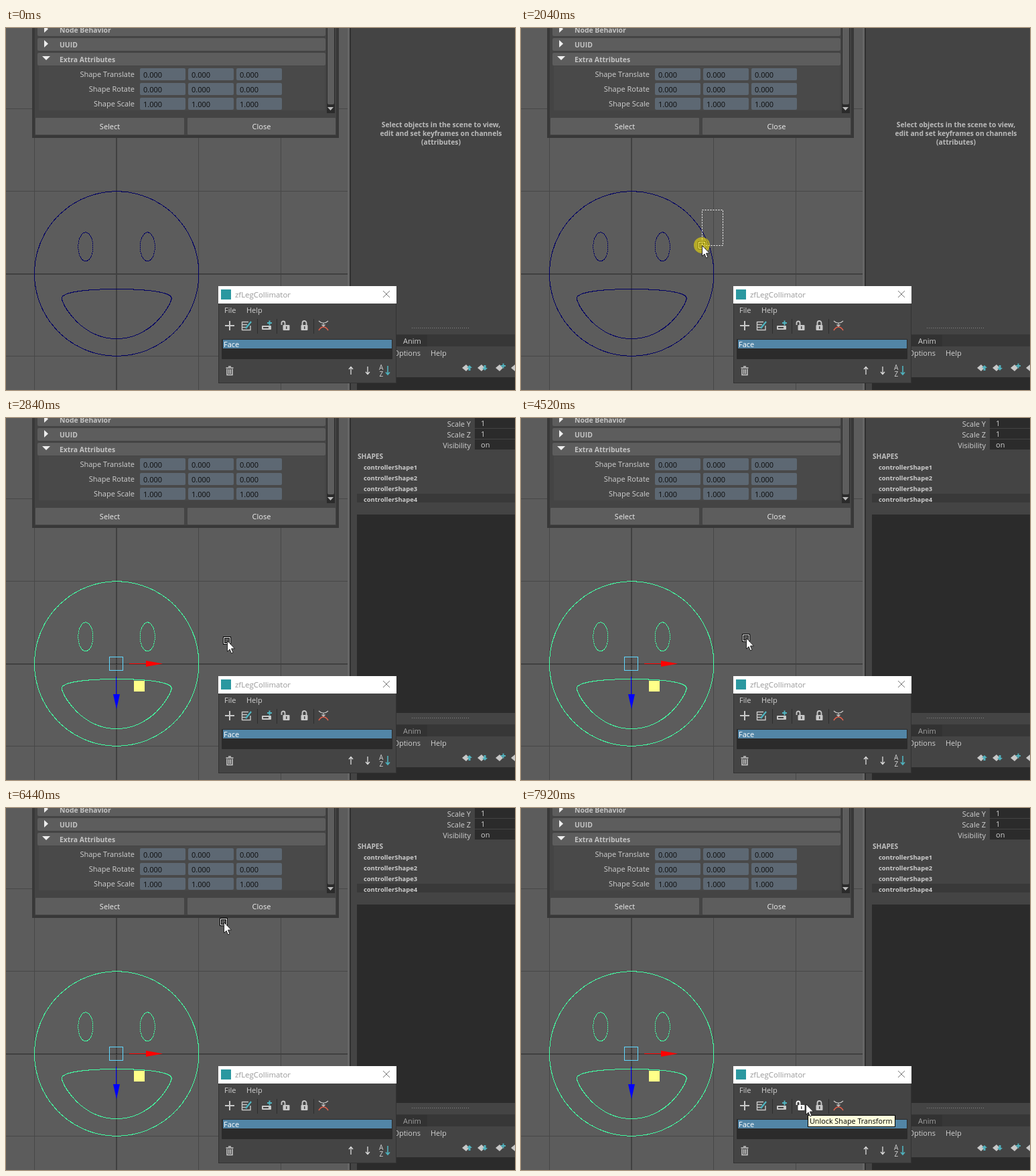
Write an HTML page with a canvas that moves like this. It is 760x540 px and loops after 8 s.

```html
<!DOCTYPE html>
<html lang="en">
<head>
<meta charset="utf-8">
<title>Rig controller</title>
<style>
html, body { margin: 0; width: 100%; height: 100%; overflow: hidden; background: #444; }
canvas { display: block; }
</style>
</head>
<body>
<canvas id="stage" width="760" height="540"></canvas>
<script>
const c = document.getElementById('stage').getContext('2d');
const LOOP = 8000, SELECTED_AT = 2360;
const TEAL = '#4fb3bf', ICON = '#c8c8c8';

// Pointer path: time, x, y
const path = [
  [120, 520, 531], [200, 455, 440], [280, 370, 330], [360, 325, 304], [480, 313, 338],
  [640, 313, 338], [680, 309, 334], [720, 317, 328], [1280, 317, 328], [1520, 301, 271],
  [1800, 301, 271], [2040, 270, 324], [2480, 270, 324], [2840, 330, 332],
  [4480, 330, 332], [4520, 336, 328], [4880, 700, 110], [5080, 650, 7], [5320, 543, 16],
  [5400, 480, 42], [5560, 306, 131], [5720, 190, 115], [5840, 158, 95], [6160, 468, 61],
  [6240, 435, 78], [6440, 325, 170], [6640, 50, 300], [6840, 200, 400], [7040, 429, 441],
  [7080, 429, 441], [7200, 425, 441]
];

function pointerAt(t) {
  const i = path.findIndex(p => p[0] > t);
  if (i < 0) return path[path.length - 1].slice(1);
  const [t0, x0, y0] = path[i - 1], [t1, x1, y1] = path[i];
  const k = (t - t0) / (t1 - t0);
  return [Math.round(x0 + (x1 - x0) * k), Math.round(y0 + (y1 - y0) * k)];
}

function box(color, x, y, w, h, radius = 0) {
  c.fillStyle = color;
  c.beginPath();
  c.roundRect(x, y, w, h, radius);
  c.fill();
}
function frame(color, x, y, w, h) {
  c.strokeStyle = color;
  c.lineWidth = 1;
  c.strokeRect(x + .5, y + .5, w - 1, h - 1);
}
function text(s, x, y, { color = '#d0d0d0', size = 11, weight = 400, align = 'left' } = {}) {
  c.font = `${weight} ${size}px "Open Sans", sans-serif`;
  c.fillStyle = color;
  c.textAlign = align;
  c.fillText(s, x, y);
}
function line(color, d, width = 1) {
  c.strokeStyle = color;
  c.lineWidth = width;
  c.stroke(new Path2D(d));
}
function shape(color, d) {
  c.fillStyle = color;
  c.fill(new Path2D(d));
}
function at(x, y, draw) {
  c.save();
  c.translate(x, y);
  draw();
  c.restore();
}

// The face is drawn in whole pixels, without smoothing
const face = new Path2D();
function pixelCurve(point, steps) {
  for (let i = 0; i <= steps; i++) {
    const [x, y] = point(i / steps);
    face.rect(Math.floor(x), Math.floor(y), 1, 1);
  }
}
function pixelEllipse(cx, cy, rx, ry) {
  pixelCurve(k => [cx + rx * Math.cos(k * 2 * Math.PI), cy + ry * Math.sin(k * 2 * Math.PI)], rx * 8);
}
function pixelBezier(...points) {
  pixelCurve(k => [0, 1].map(axis => {
    const [a, b, d, e] = points.map(p => p[axis]), m = 1 - k;
    return m * m * m * a + 3 * m * m * k * b + 3 * m * k * k * d + k * k * k * e;
  }), 180);
}
pixelEllipse(165.2, 366.5, 122.7, 122.7);
pixelEllipse(118.8, 326.3, 11, 21.5);
pixelEllipse(211.3, 326.3, 11, 21.5);
for (const side of [-1, 1]) {
  const x = dx => 165.2 + side * dx;
  pixelBezier([x(82), 403], [x(81), 393], [x(40), 389.5], [x(0), 389.5]);
  pixelBezier([x(82), 403], [x(82), 411], [x(54), 463.5], [x(0), 463.5]);
}

function viewport(selected) {
  box('#5c5c5c', 0, 0, 510, 540);
  for (const x of [42, 287, 410]) box('#474747', x, 0, 1, 540);
  for (const y of [120, 243, 489]) box('#474747', 0, y, 510, 1);
  box('#404040', 164, 0, 2, 540);
  box('#404040', 0, 366, 510, 2);

  c.fillStyle = selected ? '#43ffa3' : '#000064';
  c.fill(face);
  if (!selected) return;
  frame('#5fd7ff', 154, 356, 21, 21);
  box('#202020', 164, 366, 2, 1);
  line('#f00', 'M184 366.5H210');
  shape('#f00', 'M209 362L234 366.5L209 371Z');
  line('#00f', 'M164.5 386V413');
  shape('#00f', 'M160 412H170L165 434Z');
  box('#ffff88', 191, 392, 16, 16);
}

function channelBox(selected) {
  box('#444', 510, 0, 250, 540);
  box('#666', 510, 0, 3, 540);
  box('#303030', 513, 0, 2, 540);
  if (selected) {
    const labels = [['Scale Y', '1'], ['Scale Z', '1'], ['Visibility', 'on']];
    labels.forEach(([label, value], i) => {
      box('#2b2b2b', 700, i * 16, 60, 15);
      text(label, 694, 13 + i * 16, { align: 'right' });
      text(value, 709, 12 + i * 16);
    });
    box('#393939', 524, 113, 236, 13);
    text('SHAPES', 525, 61, { size: 10.2, weight: 700, color: '#c0c0c0' });
    for (let i = 1; i < 5; i++)
      text('controllerShape' + i, 534, 61 + i * 16, { size: 9.4, weight: 700 });
    box('#2b2b2b', 524, 144, 236, 296);
  } else {
    ['Select objects in the scene to view,', 'edit and set keyframes on channels', '(attributes)']
      .forEach((s, i) => text(s, 649.5, 148 + i * 13, { size: 10.3, weight: 700, color: '#bbb', align: 'center' }));
  }
  for (let x = 606; x < 692; x += 3) box('#888', x, 447, 1, 1);

  box('#373737', 524, 457, 236, 18);
  box('#323232', 570, 458, 59, 17);
  text('Anim', 593, 471, { color: selected ? '#a0a0a0' : '#d0d0d0' });
  text('Options', 619, 489, { align: 'right' });
  text('Help', 634, 489);
  box('#2b2b2b', 524, 521, 236, 19);
  [[687, 'up'], [710, 'down'], [737, 'plus'], [760, '']].forEach(([x, mark]) => at(x, 507, () => {
    shape(ICON, 'M-6 0L0 -5L5 0L0 5Z');
    if (mark === 'up') shape(TEAL, 'M5 -4L9 0H6.5V4H3.5V0H1Z');
    if (mark === 'down') shape(TEAL, 'M5 4L9 0H6.5V-4H3.5V0H1Z');
    if (mark === 'plus') line(TEAL, 'M2 -3H9M5.5 -6.5V.5', 2);
  }));
}

function attributeDialog() {
  box('#383838', 39, 0, 458, 164);
  box('#444', 43, 0, 450, 160);
  box('#494949', 49, 57, 427, 66);
  ['Node Behavior', 'UUID', 'Extra Attributes'].forEach((s, i) => {
    const y = -7 + i * 22;
    box('#5d5d5d', 47, y, 430, 19, 2);
    text(s, 80, y + 14, { size: 10.4, weight: 700, color: '#c4c4c4' });
    shape('#eee', i < 2 ? `M57 ${y + 3}L63 ${y + 8.5}L57 ${y + 14}Z` : 'M54 42H66L60 48Z');
  });
  ['Translate', 'Rotate', 'Scale'].forEach((s, row) => {
    const y = 60 + row * 22;
    text('Shape ' + s, 192, y + 13, { align: 'right' });
    for (const x of [200, 272, 344]) {
      box('#5d6873', x, y, 68, 18, 2);
      text(s === 'Scale' ? '1.000' : '0.000', x + 5, y + 14, { color: '#0c0c0c' });
    }
  });
  box('#2b2b2b', 479, 0, 12, 127);
  box('#5d5d5d', 480, -4, 10, 118, 2);
  shape('#bbb', 'M480 118H489L484.5 123Z');
  for (const [x, w, s] of [[44, 222, 'Select'], [271, 221, 'Close']]) {
    box('#5d5d5d', x, 134, w, 25, 1);
    text(s, x + w / 2, 151, { color: '#eee', align: 'center' });
  }
}

function padlock(x, open, color) {
  at(x, 444, () => {
    box(color, -4.5, -1, 10, 8, 1);
    line(color, open ? 'M-1.5 -1V-4A2.5 2.5 0 0 0 -6.5 -4V-1' : 'M-2.5 -1V-4A3 3 0 0 1 3.5 -4V-1', 1.8);
    box('#444', 0, 1, 1.5, 4);
  });
}

function rigDialog(hover) {
  box('#333', 317, 385, 266, 145);
  box('#444', 318, 411, 264, 118);
  box('#fff', 317, 385, 266, 26);
  box('#2b98a0', 321, 390, 15, 15);
  text('zfLegCollimator', 342, 402, { size: 11.4, color: '#999' });
  line('#777', 'M563 392L573 402M573 392L563 402');
  text('File', 326, 425);
  text('Help', 359, 425);

  line(ICON, 'M327 444H341M334 437V451', 2);
  line(ICON, 'M352.5 438.5H362M352.5 442.5H360M352.5 446.5H359M352.5 450.5H365V444M352.5 438V451', 1.4);
  line(TEAL, 'M358 448L366 438', 2.4);
  box(ICON, 382, 444, 14, 6, 1);
  box('#444', 384, 446, 8, 2);
  line(TEAL, 'M390 440H397M393.5 436.5V443.5', 2);
  for (const x of [375, 404, 459]) box('#2e2e2e', x, 434, 1, 22);
  padlock(418, true, hover ? '#fff' : ICON);
  padlock(445, false, ICON);
  line('#e0604c', 'M467 451Q470 446 474 446T481 451', 1.6);
  line(ICON, 'M467 437Q470 440 474 440T481 437M474 440V445M471.5 442.5L474 445L476.5 442.5', 1.2);

  box('#2b2b2b', 322, 464, 255, 30, 1);
  box('#5285a6', 324, 465, 252, 13);
  text('Face', 325, 476, { color: '#fff' });

  line(ICON, 'M328.5 507H339.5M332 505H336M330 508.5V517.5H338V508.5M332.7 509V516M335.3 509V516', 1.5);
  line('#ddd', 'M515 517V506M512 509L515 505.5L518 509M540 505V516M537 513L540 516.5L543 513', 1.3);
  text('A', 557, 510, { size: 10 });
  text('Z', 557.5, 520, { size: 10 });
  line(TEAL, 'M570 504V517M567 513.5L570 517L573 513.5', 1.6);
}

function inside(x, y, left, top, right, bottom) {
  return x >= left && x < right && y >= top && y < bottom;
}

function pointer(x, y, pressed) {
  const overViewport = x < 510 && !inside(x, y, 39, 0, 497, 164) && !inside(x, y, 317, 385, 583, 530);
  if (overViewport) {
    frame('#000', x - 6, y - 6, 12, 12);
    frame('#fff', x - 5, y - 5, 10, 10);
    frame('#000', x - 4, y - 4, 8, 8);
  }
  if (pressed) {
    c.fillStyle = 'rgba(255, 235, 0, .55)';
    c.beginPath();
    c.arc(x, y, 12, 0, 2 * Math.PI);
    c.fill();
  }
  at(x, y, () => {
    const arrow = 'M.5 .5V16.5L4 13L6.5 19L9 18L6.5 12H11.5Z';
    shape('#fff', arrow);
    line('#222', arrow);
  });
}

function draw(t) {
  const selected = t >= SELECTED_AT;
  viewport(selected);
  channelBox(selected);
  attributeDialog();
  rigDialog(t >= 7040);
  if (t < 120) return;

  const [x, y] = pointerAt(t);
  if (t >= 1800 && !selected) {
    c.setLineDash([2, 2]);
    frame('#fff', x, 271, 302 - x, y - 270);
    c.setLineDash([]);
  }
  if (t >= 7920) {
    box('#ffffdc', 428, 458, 131, 18);
    frame('#000', 428, 458, 131, 18);
    text('Unlock Shape Transform', 431, 471, { color: '#000', size: 10.8 });
  }
  pointer(x, y, t >= 1600 && !selected);
}

const start = performance.now();
function tick() {
  const t = (performance.now() - start) % LOOP;
  draw(Math.floor(t / 40) * 40);
  requestAnimationFrame(tick);
}
tick();
</script>
</body>
</html>
```
